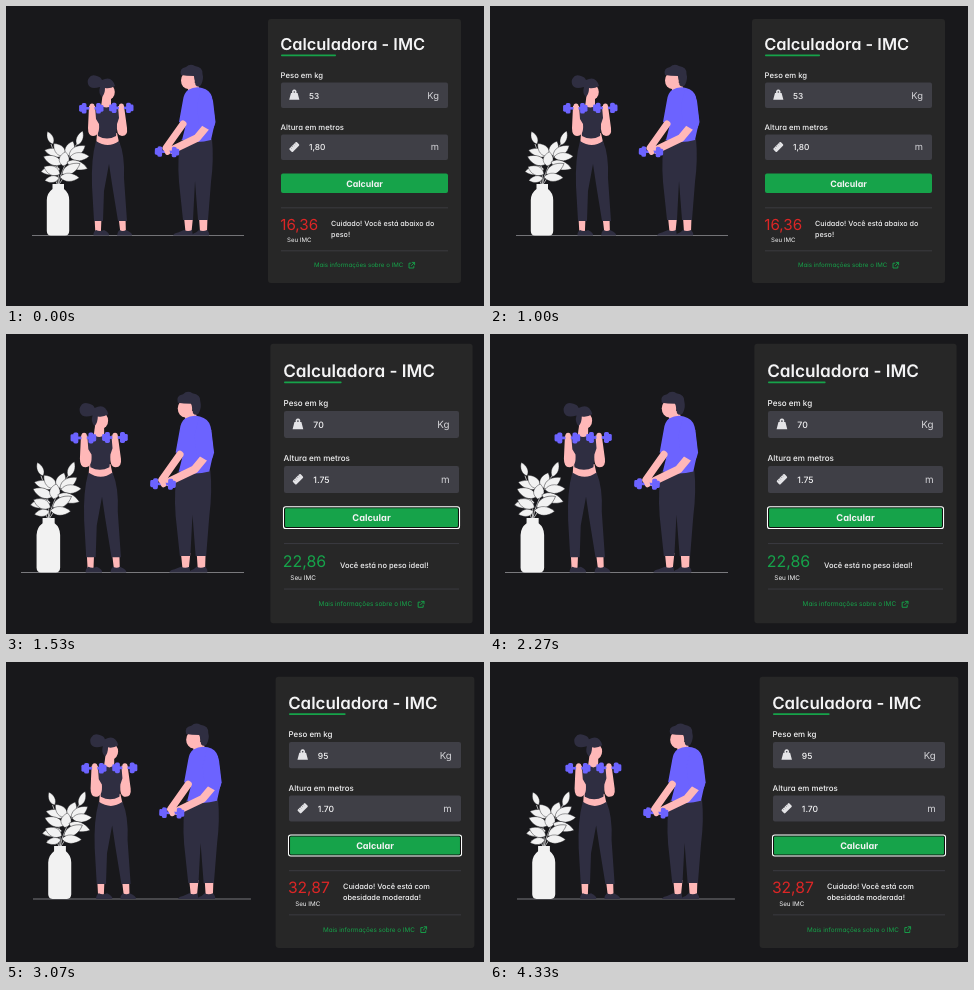
Recreate the animation shown at these times as an HTML page. Size 478 by 300 pixels, loop 4.59 s.

```html
<!DOCTYPE html>
<html lang="pt-BR">
<head>
<meta charset="utf-8">
<title>Calculadora - IMC</title>
<style>
  html, body { margin: 0; width: 100%; height: 100%; overflow: hidden; background: #18181b; }
  svg { display: block; width: 478px; height: 300px; }
  text { font-family: Inter, "Open Sans", sans-serif; font-feature-settings: "cv11"; fill: #f4f4f5; text-rendering: geometricPrecision; }

  .scene { visibility: hidden; animation: 4590ms step-end infinite; }
  .low { animation-name: low; }
  .ideal { animation-name: ideal; }
  .high { animation-name: high; }
  @keyframes low { 0% { visibility: visible; } 33.333%, 100% { visibility: hidden; } }
  @keyframes ideal { 0% { visibility: hidden; } 33.333% { visibility: visible; } 66.885%, 100% { visibility: hidden; } }
  @keyframes high { 0% { visibility: hidden; } 66.885%, 100% { visibility: visible; } }

  .title { font-size: 16.4px; font-weight: 600; }
  .label { font-size: 7.7px; font-weight: 500; }
  .value { font-size: 8.3px; font-weight: 500; }
  .unit { font-size: 9.4px; fill: #d4d4d8; text-anchor: end; }
  .button { font-size: 8.8px; font-weight: 700; text-anchor: middle; }
  .score { font-size: 15.2px; text-anchor: middle; }
  .caption { font-size: 6.1px; text-anchor: middle; }
  .note { font-size: 7.2px; font-weight: 500; }
  .link { font-size: 6.15px; fill: #16a34a; }
  .red { fill: #dc2626; }
  .green { fill: #16a34a; }
  .dark { fill: #2f2e41; }
  .skin { fill: #ffb8b8; }
  .violet { fill: #6c63ff; }
  .arm { fill: none; stroke: #ffb8b8; stroke-linecap: round; stroke-linejoin: round; }
  .leaf { fill: #f2f2f2; stroke: #18181b; stroke-width: .35; }
  .stem { fill: none; stroke: #f2f2f2; stroke-width: .7; }
</style>
</head>
<body>
<svg viewBox="0 0 478 300">
  <defs>
    <path id="leaf" class="leaf" d="M0 0C-6-4-5-11 0-16C5-11 6-4 0 0Z"/>

    <g id="bell" class="violet">
      <rect x="-9" y="-1.3" width="18" height="2.6"/>
      <rect x="-12.2" y="-3.4" width="4.4" height="6.8" rx="1.4"/>
      <rect x="-9.6" y="-5.2" width="4.8" height="10.4" rx="1.6"/>
      <rect x="4.8" y="-5.2" width="4.8" height="10.4" rx="1.6"/>
      <rect x="7.8" y="-3.4" width="4.4" height="6.8" rx="1.4"/>
    </g>

    <g id="plant">
      <path class="stem" d="M52 180Q54 160 45 138M52 180Q55 162 72 136M52 180Q60 166 78 150M52 180Q47 165 38 167"/>
      <use href="#leaf" transform="translate(47 138) rotate(-24) scale(.7 .85)"/>
      <use href="#leaf" transform="translate(71 139) rotate(22) scale(.75 .95)"/>
      <use href="#leaf" transform="translate(58 149) rotate(-76) scale(1 1.25)"/>
      <use href="#leaf" transform="translate(59 150) rotate(-42) scale(1.1 1.05)"/>
      <use href="#leaf" transform="translate(61 150) rotate(22) scale(1.1 1)"/>
      <use href="#leaf" transform="translate(63 150) rotate(58) scale(1.1 1.2)"/>
      <use href="#leaf" transform="translate(64 151) rotate(88) scale(1 1.2)"/>
      <use href="#leaf" transform="translate(56 158) rotate(-68) scale(1.1 1.25)"/>
      <use href="#leaf" transform="translate(57 160) rotate(10) scale(1.2 .9)"/>
      <use href="#leaf" transform="translate(61 156) rotate(108) scale(1.1 1.35)"/>
      <use href="#leaf" transform="translate(54 163) rotate(-98) scale(1.1 1.2)"/>
      <use href="#leaf" transform="translate(56 168) rotate(60) scale(1.1 1.3)"/>
      <use href="#leaf" transform="translate(54 168) rotate(-66) scale(1.1 1.1)"/>
      <use href="#leaf" transform="translate(54 171) rotate(92) scale(1 1.2)"/>
      <use href="#leaf" transform="translate(53 172) rotate(-100) scale(.8 .9)"/>
      <path fill="#f2f2f2" d="M46.5 178H58V183Q63.2 187 63.2 194V225Q63 229.5 59 229.5H45Q41 229.5 40.8 225V194Q41 187 46.5 183Z"/>
    </g>

    <g id="woman">
      <path class="skin" d="M88.5 211h7l-.6 15h-5.6zM112.5 211h7l.4 15h-5.6z"/>
      <path class="dark" d="M90 224Q94 226 98 224Q104 227 103 229.5H87.5Q87 226 90 224ZM113.5 224Q117 226 120 224Q127 227 126 229.5H111Q111 226 113.5 224Z"/>
      <path class="skin" d="M91 127H111L114 141H90Z"/>
      <path class="dark" d="M90 135Q102 143 113 135Q119 149 118 172L121 215H112L106 178L103 158L98 185L97 215H88L86 180Q85 153 90 135Z"/>
      <path class="skin" d="M97 86L105 89V102Q100 106 95 101Z"/>
      <path class="dark" d="M94 98Q100 105 107 98L114 102Q117 107 116 115L111 121L110 130Q101 135 92 130L91 121L87 114Q86 105 88 101Z"/>
      <path class="skin" d="M83 100H89L90 113L93 118Q94 130 87 130Q82 130 82 122ZM112 100H118L121 122Q122 130 116 130Q110 130 111 118L113 112Z"/>
      <ellipse class="skin" cx="102.8" cy="86" rx="6" ry="7.6"/>
      <path class="dark" d="M83 72Q85 68 91 70Q95 71 96 74Q106 69 109 80Q104 83 99 82Q99 88 96 91Q92 87 94 81Q84 84 82 78Q81 74 83 72Z"/>
      <use href="#bell" transform="translate(85.3 102.3)"/>
      <use href="#bell" transform="translate(115.3 101.9)"/>
      <path class="arm" stroke-width="5" d="M86 100v5M115.4 100v5"/>
    </g>

    <g id="man">
      <path class="skin" d="M178 211h9l-1.5 15h-6zM193 211h8.5l-.5 15h-7z"/>
      <path class="dark" d="M178 224Q182 226 186 224L187 229.5H167Q168 227 172 226.5ZM193 224Q197 226 201 224Q204 227 203 229.5H186Q187 227 190 226.5Z"/>
      <path class="dark" d="M175 133H206Q208 153 205 176L202 214H192L189 175L187 214H177L173 176Q171 151 175 133Z"/>
      <path class="skin" d="M181 76L192 77L194 88L183 91Z"/>
      <path class="violet" d="M182 84Q189 80 196 82Q204 84 206 91L209 116L205 134Q191 138 176 134L180 118L173 116L177 94Q178 87 182 84Z"/>
      <path class="arm" stroke-width="7" d="M177 118L160 142"/>
      <path class="arm" stroke-width="7.5" d="M201 120L191 132L166 144"/>
      <path class="violet" d="M195 84Q205 86 207 95L209.5 116Q208 123 205 125L193 118L191 100Z"/>
      <ellipse class="skin" cx="182" cy="74.5" rx="7" ry="8.5"/>
      <path class="dark" d="M175 69Q173 62 180 61Q184 57 189 60Q197 61 196.5 68Q198 73 195 79Q192 82 189.5 79L188 70Q180 70 175 69Z"/>
      <use href="#bell" transform="translate(161 145.8) rotate(2)"/>
      <path class="arm" stroke-width="5" d="M160 143L161.5 146.5"/>
    </g>

    <g id="art">
      <path d="M26 229.5H238" stroke="#8b8b90" stroke-width=".8"/>
      <use href="#plant"/>
      <use href="#woman"/>
      <use href="#man"/>
    </g>

    <rect id="field" x="275" width="167" height="25.5" rx="2" fill="#3f3f46"/>

    <g id="card">
      <rect x="262" y="13" width="193" height="264" rx="3" fill="#272727"/>
      <text class="title" x="274.2" y="44">Calculadora - IMC</text>
      <rect class="green" x="275" y="48.6" width="55" height="1.6" rx=".8"/>
      <text class="label" x="274.6" y="72">Peso em kg</text>
      <use href="#field" y="76.5"/>
      <path fill="#e4e4e7" d="M285 87H286.3A2.3 2.3 0 1 1 290.3 87H291.6L293.4 93.8H283.2Z"/>
      <circle cx="288.3" cy="86" r=".8" fill="#3f3f46"/>
      <text class="unit" x="433" y="92.8">Kg</text>
      <text class="label" x="274.6" y="124">Altura em metros</text>
      <use href="#field" y="128.5"/>
      <g transform="translate(288.3 141) rotate(-45)">
        <rect x="-5.2" y="-2.4" width="10.4" height="4.8" rx="1" fill="#e4e4e7"/>
        <path d="M-3-2.4v1.6M-1-2.4v1.6M1-2.4v1.6M3-2.4v1.6" stroke="#3f3f46" stroke-width=".4"/>
      </g>
      <text class="unit" x="433" y="144.4">m</text>
      <rect class="green" x="275" y="167.5" width="167" height="19.5" rx="2"/>
      <text class="button" x="358.5" y="180.5">Calcular</text>
      <path d="M275 201.8H442M275 244.8H442" stroke="#3f3f46" stroke-width=".8"/>
      <text class="caption" x="293.2" y="236.4">Seu IMC</text>
      <text class="link" x="308" y="261.2">Mais informações sobre o IMC</text>
      <path d="M405.2 257.2H403V262H407.8V259.8M405.8 256.4H408.6V259.2M408.6 256.4L405.2 259.8" fill="none" stroke="#16a34a" stroke-width=".9"/>
    </g>

    <g id="ring" fill="none">
      <rect x="275.5" y="168" width="166" height="18.6" rx="1.6" stroke="#101010"/>
      <rect x="274.5" y="167" width="168" height="20.6" rx="2.2" stroke="#fff"/>
    </g>
  </defs>

  <rect width="478" height="300" fill="#18181b"/>

  <g class="scene low">
    <use href="#art"/>
    <use href="#card"/>
    <text class="value" x="303" y="92.6">53</text>
    <text class="value" x="303" y="144.2">1,80</text>
    <text class="score red" x="293.2" y="223.6">16,36</text>
    <text class="note" x="325" y="219.8">Cuidado! Você está abaixo do</text>
    <text class="note" x="325" y="230.6">peso!</text>
  </g>

  <g class="scene ideal">
    <use href="#art" transform="translate(15 238.5) scale(1.052 1.058) translate(-26 -229.5)"/>
    <g transform="translate(278 77) scale(1.048 1.058) translate(-275 -76.5)">
      <use href="#card"/>
      <use href="#ring"/>
      <text class="value" x="303" y="92.6">70</text>
      <text class="value" x="303" y="144.2">1.75</text>
      <text class="score green" x="294.6" y="223.6">22,86</text>
      <text class="note" x="328.4" y="225.2">Você está no peso ideal!</text>
    </g>
  </g>

  <g class="scene high">
    <use href="#art" transform="translate(27 237) scale(1.028) translate(-26 -229.5)"/>
    <g transform="translate(283 80) scale(1.03 1.027) translate(-275 -76.5)">
      <use href="#card"/>
      <use href="#ring"/>
      <text class="value" x="303" y="92.6">95</text>
      <text class="value" x="303" y="144.2">1.70</text>
      <text class="score red" x="294.3" y="223.6">32,87</text>
      <text class="note" x="327.4" y="220">Cuidado! Você está com</text>
      <text class="note" x="327.4" y="230.8">obesidade moderada!</text>
    </g>
  </g>
</svg>
</body>
</html>
```
